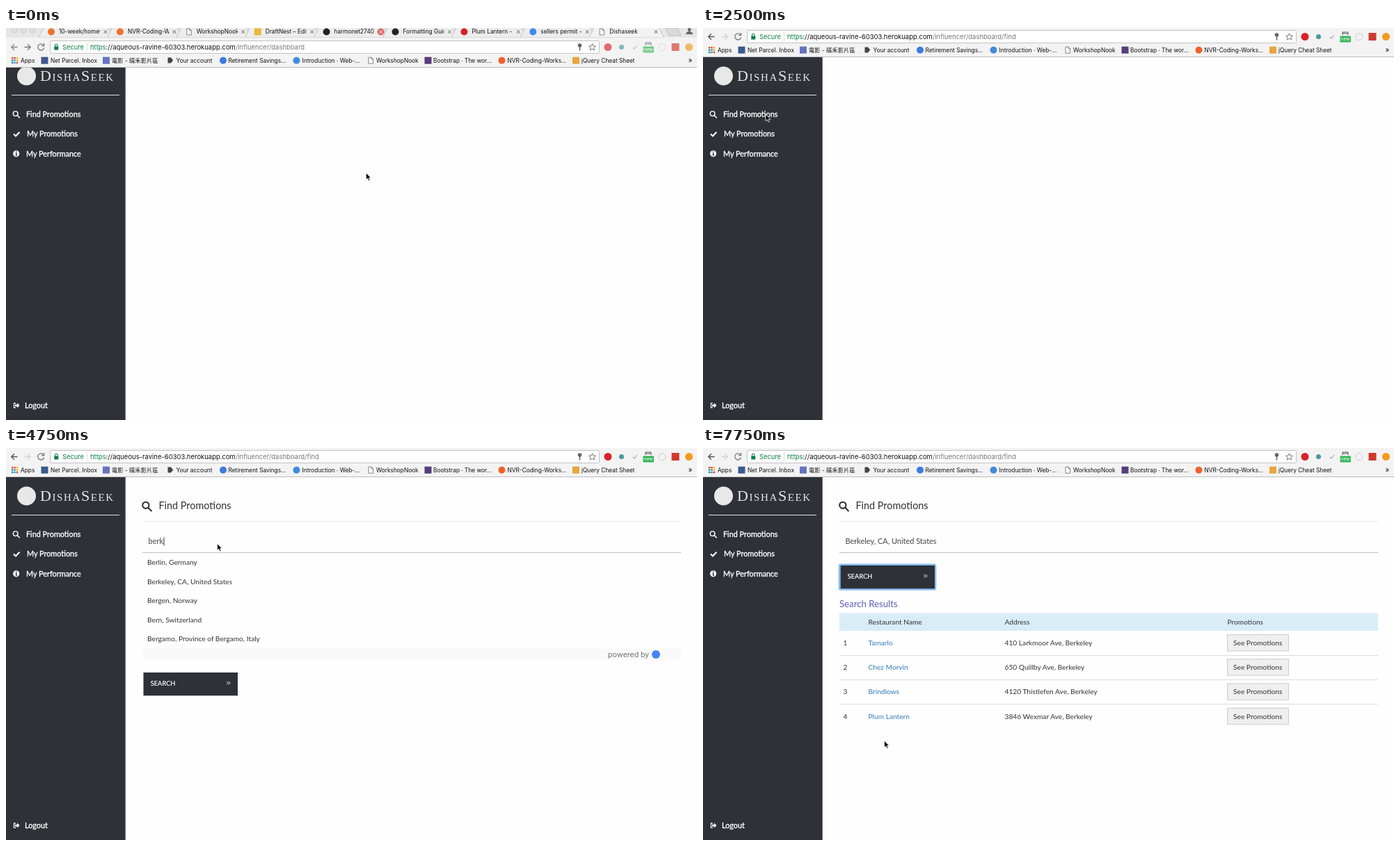
Animation of 993x564 px, one loop 8 s. Source, as an HTML page:

```html
<!DOCTYPE html>
<html lang="en">
<head>
<meta charset="utf-8">
<title>Find promotions</title>
<style>
html, body { margin: 0; width: 100%; height: 100%; overflow: hidden; background: #fefefe; }
svg { display: block; }
text { white-space: pre; }
.ui { font: 8.3px Inter, "Noto Sans CJK TC", "Noto Sans CJK SC", sans-serif; fill: #111; }
.page { font: 10.2px Lato, sans-serif; fill: #333; }
.menu { font-size: 10.85px; fill: #fff; stroke: #fff; stroke-width: .35; }
.menu.on { fill: #2f3138; stroke: none; }
.brand { font: 22px "Liberation Serif", serif; font-variant: small-caps; letter-spacing: 1.6px; fill: #e8e8e8; }
.line { fill: none; stroke-width: 1.6; }
</style>
</head>
<body>
<svg id="stage" width="993" height="564" viewBox="0 0 993 564"></svg>
<script>
const DARK = '#2f3138', STEP = 250, LOOP = 8000;
const HOST = 'https://aqueous-ravine-60303.herokuapp.com';
const PATH = '/influencer/dashboard';

const text = (x, y, s, attrs = '') => `<text x="${x}" y="${y}" ${attrs}>${s}</text>`;
const rect = (x, y, w, h, fill, attrs = '') =>
  `<rect x="${x}" y="${y}" width="${w}" height="${h}" fill="${fill}" ${attrs}/>`;
const dot = (x, y, r, fill, attrs = '') => `<circle cx="${x}" cy="${y}" r="${r}" fill="${fill}" ${attrs}/>`;
const path = (d, stroke, attrs = '') => `<path class="line" d="${d}" stroke="${stroke}" ${attrs}/>`;
const group = (id, body, attrs = '') => `<g id="${id}" ${attrs}>${body}</g>`;
const square = (x, y, fill) => rect(x - 5, y - 5, 10, 10, fill);
const ball = (x, y, fill) => dot(x, y, 5, fill);
const sheet = (x, y) =>
  path(`M${x - 3} ${y - 4.5}h4l2.5 2.5v6.5h-6.5zM${x + 1} ${y - 4.5}v2.5h2.5`, '#666', 'style="stroke-width:.8;fill:#fff"');
const cross = (x, y, color) => path(`M${x - 2.3} ${y - 2.3}l4.6 4.6m0 -4.6l-4.6 4.6`, color, 'style="stroke-width:1"');
const lens = (x, y, r, color) =>
  `<g fill="none" stroke="${color}" stroke-width="${r * .45}"><circle cx="${x - r * .25}" cy="${y - r * .25}" r="${r}"/>` +
  `<path d="M${x + r * .5} ${y + r * .5}l${r} ${r}" stroke-linecap="round"/></g>`;

// Browser chrome, placed so that the tab strip lies above the stage
const tabs = [
  [ball, '#f0702c', '10-week/homework'],
  [ball, '#f0702c', 'NVR-Coding-Workshop'],
  [sheet, '', 'WorkshopNook'],
  [square, '#e9b93c', 'DraftNest – Editor'],
  [ball, '#222', 'harmonet2740'],
  [ball, '#222', 'Formatting Guide'],
  [ball, '#d32323', 'Plum Lantern - Ser'],
  [ball, '#4285f4', 'sellers permit - S'],
  [sheet, '', 'Dishaseek'],
];
const tab = ([icon, color, title], i) => {
  const x = 98.9 * i, active = i === tabs.length - 1;
  return `<path d="M${x + 47} -1.5L${x + 55} -18H${x + 146}L${x + 154} -1.5Z" fill="${active ? '#f3f3f3' : '#ededed'}" stroke="#b8b8b8" stroke-width=".8"/>` +
    icon(x + 65, -9.5, color) +
    `<svg x="${x + 76}" y="-18" width="59" height="16">${text(0, 11.4, title)}</svg>` +
    (i === 4 ? dot(x + 143, -9.5, 5, '#dc6a62') + cross(x + 143, -9.5, '#fff') : cross(x + 143, -9.5, '#555'));
};

const bookmarks = [
  [55.5, square, '#3c5a8c', 64, 'Net Parcel. Inbox'],
  [144, square, '#6673c0', 152, '電影 - 晴禾影片區'],
  [312, ball, '#3c7be0', 319.5, 'Retirement Savings...'],
  [417.5, ball, '#3f8ae0', 425.5, 'Introduction · Web-...'],
  [524, sheet, '', 532, 'WorkshopNook'],
  [606.5, square, '#563d7c', 614, 'Bootstrap · The wor...'],
  [712.5, ball, '#f0602c', 720.5, 'NVR-Coding-Works...'],
  [819, square, '#e8a63c', 827, 'jQuery Cheat Sheet'],
];
const appColors = ['#db4437', '#db4437', '#f4b400', '#0f9d58', '#4285f4', '#f4b400', '#0f9d58', '#4285f4', '#db4437'];

const extensions = dot(865, 12.5, 5.5, '#d8232a') + dot(884.5, 12.5, 3.5, '#4a9a9c') +
  path('M901 13l2 2l4 -5', '#aaa', 'style="stroke-width:1.2"') +
  path('M919 10v-4h8v4M919 8h8', '#555', 'style="stroke-width:1"') +
  rect(915.5, 11.5, 15.5, 9, '#2fb457', 'rx="1"') +
  text(923.2, 18.3, 'new', 'style="font-size:7px;fill:#fff" text-anchor="middle"') +
  dot(943, 12.5, 5, 'none', 'stroke="#ccc"') +
  rect(956.5, 7, 11, 11, '#cf3a30') + dot(981.5, 12.5, 5.5, '#f39a1e');

const chrome = rect(0, -20, 993, 20, '#e6e6e6') +
  [12, 25, 38].map(x => dot(x, -12, 4.2, '#dedede', 'stroke="#cbcbcb" stroke-width=".7"')).join('') +
  tabs.map(tab).join('') +
  '<path d="M948 -15h17l5 11h-17z" fill="#dadada" stroke="#b8b8b8" stroke-width=".8"/>' +
  dot(982, -12.5, 2.4, '#666') + '<path d="M977 -6a5 4 0 0 1 10 0z" fill="#666"/>' +
  rect(0, -1.5, 993, 42.5, '#f3f3f3') + rect(0, 41, 993, 1, '#bcbcbc') +
  path('M16.5 12.5H8M12 8.3L7.7 12.5L12 16.7', '', 'id="back" style="stroke-width:1.3"') +
  path('M26.5 12.5H35M31 8.3L35.3 12.5L31 16.7', '', 'id="next" style="stroke-width:1.3"') +
  path('M54 10A4.5 4.5 0 1 0 54.6 13.5M54.6 7v3.7h-3.7', '#777', 'style="stroke-width:1.3"') +
  rect(63.5, 3.5, 789, 18, '#fff', 'rx="2" stroke="#c2c2c2"') +
  rect(69.3, 11.5, 6, 5, '#0b8043', 'rx=".6"') + path('M70.5 12v-2a1.8 1.8 0 0 1 3.6 0v2', '#0b8043', 'style="stroke-width:1.1"') +
  text(81, 16, 'Secure', 'style="font-size:9.3px;fill:#0b8043"') + rect(116, 6, 1, 13, '#ddd') +
  text(121, 16, `<tspan fill="#0b8043">https</tspan>${HOST.slice(5)}<tspan id="url" fill="#777"></tspan>`, 'style="font-size:9.47px"') +
  dot(824.5, 10, 2.8, '#666') + rect(823.7, 11, 1.6, 6.5, '#666') +
  path('M842.5 7.7l1.4 3.2l3.5 .3l-2.6 2.3l.8 3.4l-3.1 -1.8l-3.1 1.8l.8 -3.4l-2.6 -2.3l3.5 -.3z', '#666', 'style="stroke-width:.9"') +
  group('extensions', extensions) +
  appColors.map((c, i) => rect(8 + i % 3 * 3.4, 27 + Math.floor(i / 3) * 3.4, 2.4, 2.4, c)).join('') +
  text(21, 34.6, 'Apps') +
  bookmarks.map(([x, icon, color, tx, s]) => icon(x, 31.7, color) + text(tx, 34.6, s)).join('') +
  '<path d="M232.5 27.5h4.5l3.2 4l-3.2 4h-4.5z" fill="#444"/>' + text(244.5, 34.6, 'Your account') +
  text(980.5, 35, '»', 'style="font-size:10px"');

// Sidebar
const menu = [[29, 128, 'Find Promotions'], [30, 156.4, 'My Promotions'], [29, 184.6, 'My Performance'], [27, 547, 'Logout']];
const sidebar = rect(0, 0, 171.7, 564, DARK) + dot(29.5, 69, 13.5, '#e8e8e8') +
  text(49, 75.5, 'DishaSeek', 'class="brand"') + rect(8, 96, 155, 1, '#e0e0e0') +
  menu.map(([x, y, s]) => text(x, y, s, 'class="menu"')).join('') + lens(14.5, 124, 3.3, '#fff') +
  path('M11 152.5l3 3l5.5 -5.8', '#fff', 'style="stroke-width:2.1"') +
  dot(14.7, 180.8, 4.6, '#fff') + rect(13.9, 177.6, 1.7, 1.7, DARK) + rect(13.9, 180, 1.7, 4, DARK) +
  path('M14 539.8h-2.5v6.6h2.5', '#fff', 'style="stroke-width:1.2"') +
  '<path d="M13 541.8h3v-2.2l3.6 3.5l-3.6 3.5v-2.2h-3z" fill="#fff"/>' +
  group('hover', rect(0, 110.5, 171, 28.3, '#fff') + text(29, 128, 'Find Promotions', 'class="menu on"') + lens(14.5, 124, 3.3, DARK));

// Search form, suggestions and results
const rowY = i => 168 + 27.6 * i;
const suggestions = {
  ber: ['Berlin, Germany', 'Berkeley, CA, United States', 'Bergen, Norway', 'Bern, Switzerland', 'Bergamo, Province of Bergamo, Italy'],
  berk: ['Berkeley, CA, United States', 'Berkshire, United Kingdom', 'Berkhamsted, United Kingdom', 'Berkley, MI, United States', 'Berkeley Heights, NJ, United States'],
};
const names = words => words.map((s, i) => text(203, rowY(i), s)).join('');
const list = group('hoverRow', rect(196, 151, 774, 27, '#f7f7f7')) +
  group('ber', names(suggestions.ber)) + group('berk', names(suggestions.berk)) +
  rect(196, 289, 774, 15.5, '#f9f9f9') +
  text(865, 300.7, 'powered by', 'style="font:11.5px Roboto,sans-serif;fill:#777"') + dot(934, 297, 6, '#4285f4');

const button = group('focus', rect(196, 167.8, 138, 35.6, 'none', 'rx="2" stroke="#86bff3" stroke-width="2.6"')) +
  rect(197.5, 169, 135.5, 33.3, DARK) +
  text(207.7, 188.4, 'SEARCH', 'style="font-size:9.3px;fill:#fff;stroke:#fff;stroke-width:.2"') +
  path('M317.3 181.8l2.2 2.3l-2.2 2.3m2.7 -4.6l2.2 2.3l-2.2 2.3', '#fff', 'style="stroke-width:.9"');

const places = [
  ['Tamarlo', '410 Larkmoor Ave, Berkeley'],
  ['Chez Morvin', '650 Quillby Ave, Berkeley'],
  ['Brindlows', '4120 Thistlefen Ave, Berkeley'],
  ['Plum Lantern', '3846 Wexmar Ave, Berkeley'],
];
const placeRow = ([name, address], i) => {
  const y = 284 + 35.2 * i;
  return text(201.5, y, i + 1) + text(237.5, y, name, 'style="fill:#337ab7"') + text(433.5, y, address) +
    rect(753.5, y - 15.5, 88, 23.5, '#efefef', 'stroke="#ccc"') + text(762, y, 'See Promotions') +
    (i < 3 ? rect(196, Math.round(y + 13.7), 774, 1, '#ddd') : '');
};
const results = text(196, 228.5, 'Search Results', 'style="font-size:13.2px;fill:#5e5eb8"') +
  rect(196, 237.5, 774, 25.5, '#d9edf7') +
  text(237.5, 253.5, 'Restaurant Name') + text(433.5, 253.5, 'Address') + text(753.5, 253.5, 'Promotions') +
  places.map(placeRow).join('');

const main = lens(202, 83.5, 4.6, '#2b2b2b') + text(219.5, 88.3, 'Find Promotions', 'style="font-size:14.4px"') +
  rect(196, 105, 774, 1, '#e9e9e9') + text(204.5, 138, '', 'id="input" style="font-size:10.95px"') +
  group('caret', rect(226.5, 128.5, 1, 12, '#333')) + rect(196, 150, 774, 1, '#c0c0c0') +
  group('list', list) + group('button', button) + group('results', results);

const status = '<path d="M-1 564V553.5H328.5a2 2 0 0 1 2 2V564" fill="#f2f2f2" stroke="#b8b8b8"/>' +
  text(2, 561.8, HOST + PATH + '/find', 'style="font-size:7.68px"');

document.getElementById('stage').innerHTML = rect(0, 0, 993, 564, '#fefefe') +
  group('sidebar', sidebar, 'class="page"') + group('main', main, 'class="page"') +
  group('chrome', chrome, 'class="ui"') + group('status', status, 'class="ui"') +
  '<path id="cursor" d="M0 0V9.8L2.2 7.8L3.8 11.4L5.5 10.6L4 7.2H7Z" fill="#000" stroke="#fff" stroke-width=".8"/>';

const el = id => document.getElementById(id);
const show = (id, on) => { el(id).style.display = on ? '' : 'none'; };
const move = (id, x, y) => el(id).setAttribute('transform', `translate(${x} ${y})`);

// Key values hold until the next one: [time, ...values]
const pointer = [
  [0, 517.5, 208.5], [750, 420, 165], [1000, 210, 95], [1250, 65, 112], [1500, 66, 125], [1750, 73, 124],
  [2000, 90, 124], [3000, 83, 127], [3500, 190, 134], [3750, 290, 138], [4000, 303.5, 137.5],
  [5250, 302, 152], [5500, 300, 162], [5750, 299.5, 166.5], [6250, 268, 180], [6500, 250, 186],
  [7000, 376.5, 228.5], [7250, 470, 280], [7500, 555, 323], [7750, 260.5, 421],
];
const typed = [[0, 'Nearby City'], [4250, 'b'], [4500, 'ber'], [4750, 'berk'], [6250, 'Berkeley, CA, United States']];
const at = (keys, t) => keys.filter(k => k[0] <= t).pop().slice(1);

function render(time) {
  const t = Math.floor(time % LOOP / STEP) * STEP;
  const between = (from, to) => t >= from && t < to;
  const loaded = t >= 2500, listed = between(4500, 6250);

  move('chrome', 0, t < 250 ? 15 : 0);
  move('cursor', ...at(pointer, t));
  move('button', 0, listed ? 154 : 0);
  el('url').textContent = PATH + (loaded ? '/find' : '');
  el('back').setAttribute('stroke', loaded ? '#555' : '#888');
  el('next').setAttribute('stroke', loaded ? '#d2d2d2' : '#777');
  el('extensions').setAttribute('opacity', loaded ? 1 : .65);
  el('input').textContent = at(typed, t)[0];
  el('input').style.fill = t < 4250 ? '#999' : '#444';

  show('main', t >= 3000);
  show('hover', between(3000, 3500));
  show('status', between(3000, 3500));
  show('caret', between(4750, 6250));
  show('list', listed);
  show('ber', t < 5250);
  show('berk', t >= 5250);
  show('hoverRow', t >= 5500);
  show('focus', t >= 6750);
  show('results', t >= 7250);
}

(function frame() {
  render(performance.now());
  requestAnimationFrame(frame);
})();
</script>
</body>
</html>
```
